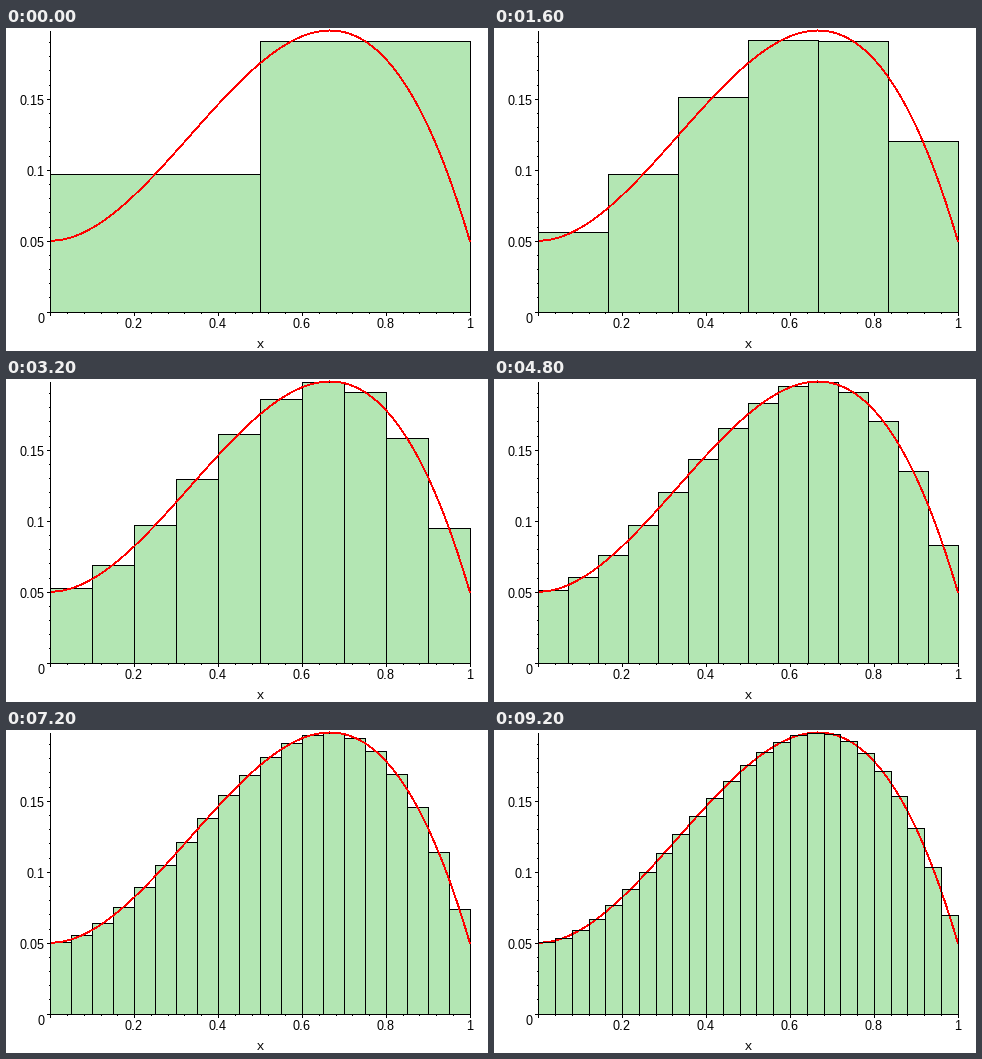
Animation, 482 px wide and 323 px high, one loop 9600 ms. Source, as a matplotlib script:

```python
import numpy as np
import matplotlib.pyplot as plt
from matplotlib.animation import FuncAnimation
from matplotlib.patches import Rectangle

W, H, DPI = 482, 323, 64
PX = 72 / DPI  # one pixel in points
LEFT, RIGHT, BASE = 44, 464, 284  # axis columns and row
FRAMES, INTERVAL = 24, 400
GREEN = (0.7, 0.9, 0.7)

plt.rcParams.update({
    "font.family": "Liberation Sans",
    "text.hinting": "default",
    "text.hinting_factor": 1,
})


def f(x):
    return 0.05 + x**2 - x**3


def to_x(x):
    return 44.25 + 419.5 * x


def to_y(y):
    return 283.65 - 1418.9 * y


def px(v):
    return int(np.floor(v + 0.5))


fig = plt.figure(figsize=(W / DPI, H / DPI), dpi=DPI, facecolor="white")
ax = fig.add_axes([0, 0, 1, 1])


def box(x0, y0, x1, y1, color="black", z=2):
    """Fill all pixels from (x0, y0) to (x1, y1), both included."""
    return ax.add_patch(Rectangle((x0, y0), x1 - x0 + 1, y1 - y0 + 1, fc=color,
                                  lw=0, antialiased=False, zorder=z))


def label(x, y, s, ha="center"):
    ax.text(x, y, s, ha=ha, va="baseline", fontsize=13 * PX, zorder=6)


def draw_axes():
    box(LEFT, 3, LEFT, BASE, z=5)
    box(LEFT, BASE, RIGHT, BASE, z=5)
    for i in range(20):
        size = 1 if i % 5 else 3
        row = px(to_y(i / 100))
        box(LEFT - size, row, LEFT - 1, row, z=5)
    for i in range(26):
        size = 1 if i % 5 else 3
        col = px(to_x(i / 25))
        box(col, BASE + 1, col, BASE + size, z=5)
    for v in (0.05, 0.1, 0.15):
        label(39, px(to_y(v)) + 6, f"{v:g}", "right")
    label(39, 295, "0", "right")
    for v in (0.2, 0.4, 0.6, 0.8, 1):
        label(px(to_x(v)) - 0.5, 300, f"{v:g}")
    label(254.5, 320, "x")


def draw_curve():
    """Paint the pixels whose centres lie within one pixel of the curve."""
    rows, cols = np.mgrid[0:H, 0:W] + 0.5
    x = (cols - to_x(0)) / (to_x(1) - to_x(0))
    gap = rows - to_y(f(x))
    slope = (to_y(1) - to_y(0)) / (to_x(1) - to_x(0)) * (2 * x - 3 * x**2)
    inside = (cols > LEFT) & (cols < RIGHT + 1) & (rows < to_y(0.05) + 1)
    image = np.zeros((H, W, 4))
    image[..., 0] = 1
    image[..., 3] = inside & (np.abs(gap) < np.hypot(1, slope))
    ax.imshow(image, extent=(0, W, H, 0), interpolation="nearest",
              aspect="auto", zorder=3)


draw_curve()
draw_axes()
ax.set_xlim(0, W)
ax.set_ylim(H, 0)
ax.axis("off")

bars = []


def draw(i):
    while bars:
        bars.pop().remove()
    n = i + 2
    # the outlines cover the curve only in the finest partition
    z = 4 if i == FRAMES - 1 else 2
    edges = [px(to_x(k / n)) for k in range(n + 1)]
    for k, (a, b) in enumerate(zip(edges, edges[1:])):
        top = px(to_y(f((k + 0.5) / n)))
        bars.extend([
            box(a, top, b, BASE, GREEN, 1),
            box(a, top, b, top, z=z),
            box(a, top, a, BASE, z=z),
            box(b, top, b, BASE, z=z),
        ])
    return bars


anim = FuncAnimation(fig, draw, frames=FRAMES, interval=INTERVAL,
                     init_func=lambda: draw(0), repeat=True, repeat_delay=0,
                     blit=False)
plt.show()
```
